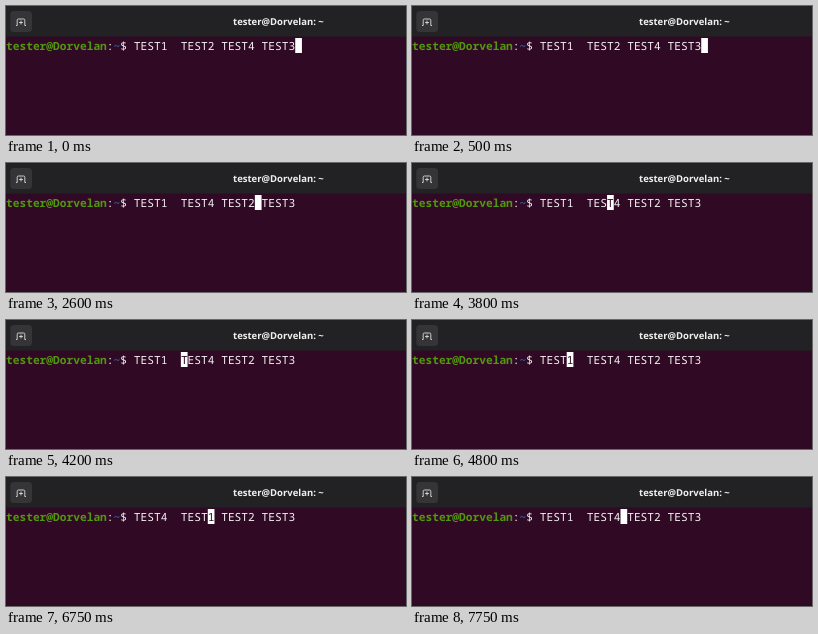
Animation of 400 by 129 pixels, one loop 8 s. Source, as an HTML page:

```html
<!DOCTYPE html>
<html lang="en">
<head>
<meta charset="utf-8">
<style>
  html, body { margin: 0; width: 100%; height: 100%; overflow: hidden; background: #300a24; }
  svg { display: block; }
  text { white-space: pre; text-rendering: geometricPrecision; }
  .title { font: 600 9.5px "Noto Sans", "Open Sans", sans-serif; fill: #f0f0f0; text-anchor: middle; }
  .term { font: 11.21px "Noto Sans Mono", "DejaVu Sans Mono", monospace; fill: #f4f1f3; }
  .user { font-weight: bold; fill: #52980e; }
  .path { font-weight: bold; fill: #2a5c9c; }
  .under { fill: #300a24; }
</style>
</head>
<body>
<svg width="400" height="129" viewBox="0 0 400 129">
  <rect width="400" height="129" fill="#300a24"/>
  <rect width="400" height="30.6" fill="#222124"/>
  <rect x="4.3" y="5" width="21.7" height="21" rx="3.5" fill="#353437"/>
  <path d="M10 19.5h1.2v-5.3q0-1.2 1.2-1.2h5.2q1.2 0 1.2 1.2v5.3h1.2M15 14.6v3.8M13.1 16.5h3.8"
        fill="none" stroke="#dcdcdc" stroke-width=".9"/>
  <text class="title" x="272.4" y="18.8">tester@Dorvelan: ~</text>
  <g class="term">
    <text y="44"><tspan class="user">tester@Dorvelan</tspan>:<tspan class="path">~</tspan>$ </text>
    <text id="line" y="44"></text>
    <rect id="cursor" y="32" width="6.7" height="15" fill="#fff"/>
    <text id="under" class="under" y="44"></text>
  </g>
</svg>
<script>
  const LOOP = 8000, CELL = 6.726, START = 19 * CELL;
  const [line, cursor, under] = ["line", "cursor", "under"].map(id => document.getElementById(id));

  // [time in ms, cursor column, order of the words if it changes]
  const steps = [
    [0, 24, "1243"], [850, 22], [1800, 12],
    [2600, 18, "1423"], [2750, 17], [2950, 16], [3800, 10],
    [4050, 8], [4200, 7], [4500, 6], [4800, 4], [5150, 5],
    [5850, 12, "4123"], [6000, 11], [6850, 10], [7350, 5],
    [7650, 12, "1423"]
  ];

  const command = order => [...order].map((d, i) => "TEST" + d + (i ? " " : "  ")).join("");

  line.setAttribute("x", START);

  function draw(now) {
    const past = steps.filter(s => s[0] <= now % LOOP);
    const column = past.at(-1)[1];
    const text = command(past.findLast(s => s[2])[2]);
    const x = START + column * CELL;
    line.textContent = text;
    cursor.setAttribute("x", x);
    under.setAttribute("x", x);
    under.textContent = text[column] || "";
  }

  const origin = performance.now();
  function tick() {
    draw(performance.now() - origin);
    requestAnimationFrame(tick);
  }
  tick();
</script>
</body>
</html>
```
